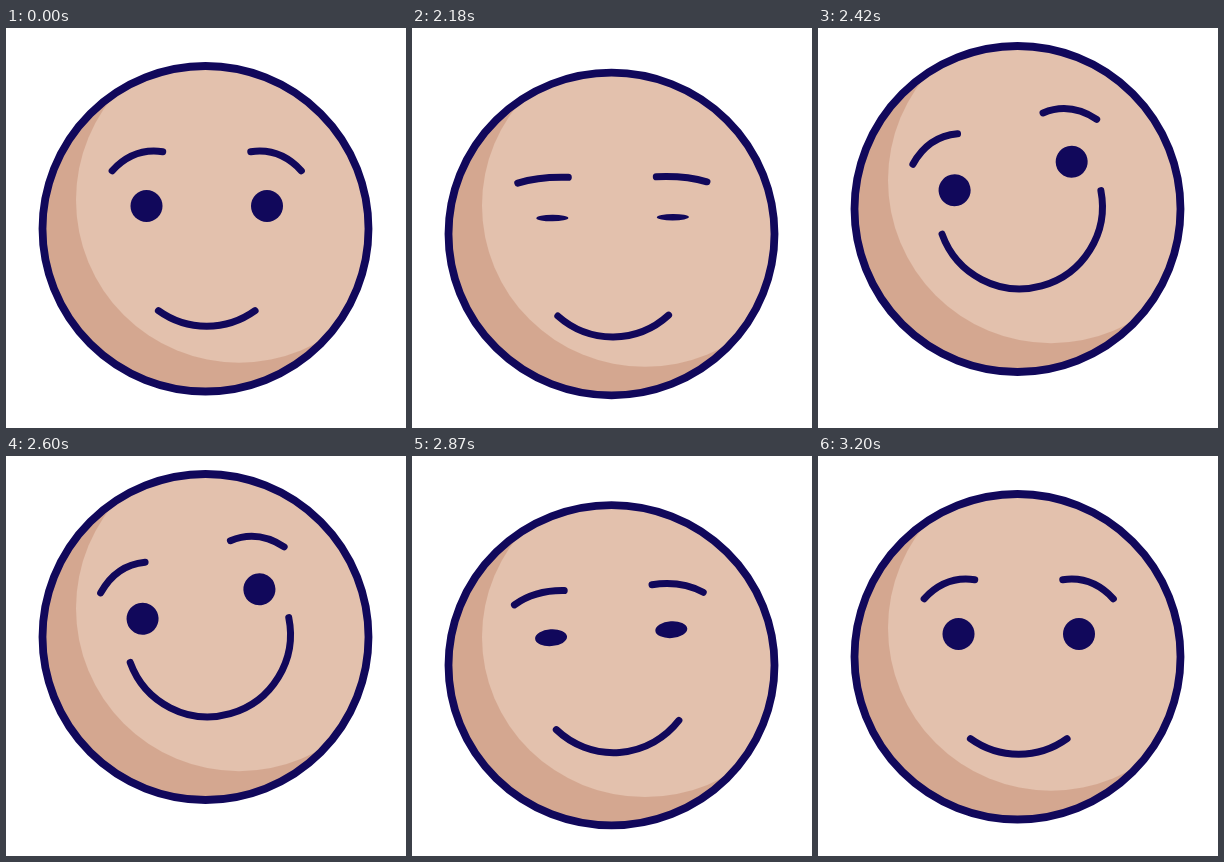
An HTML page for the animation above (3830 ms loop, 400x400 px).

```html
<!DOCTYPE html>
<html lang="en">
<head>
<meta charset="utf-8">
<title>Smiling face</title>
<style>
  html, body { margin: 0; height: 100%; overflow: hidden; background: #fff; }
  svg { display: block; width: 100%; height: 100%; }
  .line { fill: none; stroke: #11085b; stroke-width: 7; stroke-linecap: round; }
  .eye { fill: #11085b; }
</style>
</head>
<body>
<svg viewBox="0 0 400 400">
  <clipPath id="disc"><circle r="163"/></clipPath>
  <g id="head">
    <circle r="163" fill="#d4a790"/>
    <g clip-path="url(#disc)"><circle cx="33.5" cy="-28.8" r="163" fill="#e3c1ad"/></g>
    <circle r="163" class="line" style="stroke-width: 7.8"/>
  </g>
  <g id="face">
    <path id="browL" class="line"/>
    <path id="browR" class="line"/>
    <ellipse id="eyeL" class="eye" cx="-60.25" rx="16"/>
    <ellipse id="eyeR" class="eye" cx="60.25" rx="16"/>
    <path id="mouth" class="line"/>
  </g>
</svg>
<script>
const LOOP = 3830, STEP = 30, OFFSET = 20;
const FALL = 2600, LAND = 2900, RADIUS = 82.6;

const set = (id, name, value) => document.getElementById(id).setAttribute(name, value);
const ramp = (t, from, to) => Math.min(1, Math.max(0, (t - from) / (to - from)));
const smooth = u => u * u * (3 - 2 * u);
const pulse = (t, from, peak, to) =>
  smooth(ramp(t, from, peak)) * (1 - smooth(ramp(t, peak, to)));

// Eases up to 1, stays there, then drops with growing speed until landing
const hop = (t, from, to, power) =>
  smooth(ramp(t, from, to)) * (1 - ramp(t, FALL, LAND) ** power);

function draw(t) {
  const rise = hop(t, 2120, 2360, 2);
  const lift = hop(t, 2150, 2370, 3);
  const tilt = 14.1 * hop(t, 2150, 2450, 3);
  const smile = hop(t, 2150, 2430, 2);
  const squash = pulse(t, 2000, 2120, 2250) + pulse(t, 2790, LAND, 3030);
  const blink = pulse(t, 2030, 2150, 2350) + pulse(t, 2800, 2930, 3055);
  const rebound = 1.8 * pulse(t, 2920, 3080, 3200);

  const stretch = 14 * rise * (1 - rise);
  const top = 34.5 + 21 * squash - 20 * rise - stretch - rebound;
  const bottom = 367 + 9 * squash - 19.5 * rise + stretch - rebound;
  set('head', 'transform',
    `translate(199.5 ${(top + bottom) / 2}) scale(1 ${(bottom - top) / 333})`);

  const faceX = 200.75 - .41 * tilt;
  const faceY = 178 - 30 * lift + 14 * blink - rebound;
  set('face', 'transform', `translate(${faceX} ${faceY}) rotate(${-tilt})`);

  for (const [side, sign] of [['L', -1], ['R', 1]]) {
    set('brow' + side, 'd', `M${sign * 94.6} -35.2
      Q${sign * 73} ${18 * blink - 58.6} ${sign * 44} ${14.5 * blink - 54.2}`);
    set('eye' + side, 'ry', 16 * (1 - .85 * blink));
  }

  const angle = (35.8 + 50 * smile + 5 * blink) * Math.PI / 180;
  const x = RADIUS * Math.sin(angle), y = RADIUS * Math.cos(angle);
  set('mouth', 'd', `M${-x} ${y}A${RADIUS} ${RADIUS} 0 0 0 ${x} ${y}`);
  set('mouth', 'transform',
    `translate(${-.7 * rise} ${37.7 - 6.7 * rise}) rotate(${-.12 * tilt})`);
}

const start = performance.now();
function tick() {
  const time = (performance.now() - start) % LOOP;
  draw(Math.floor((time - OFFSET) / STEP) * STEP + OFFSET);
  requestAnimationFrame(tick);
}
tick();
</script>
</body>
</html>
```
